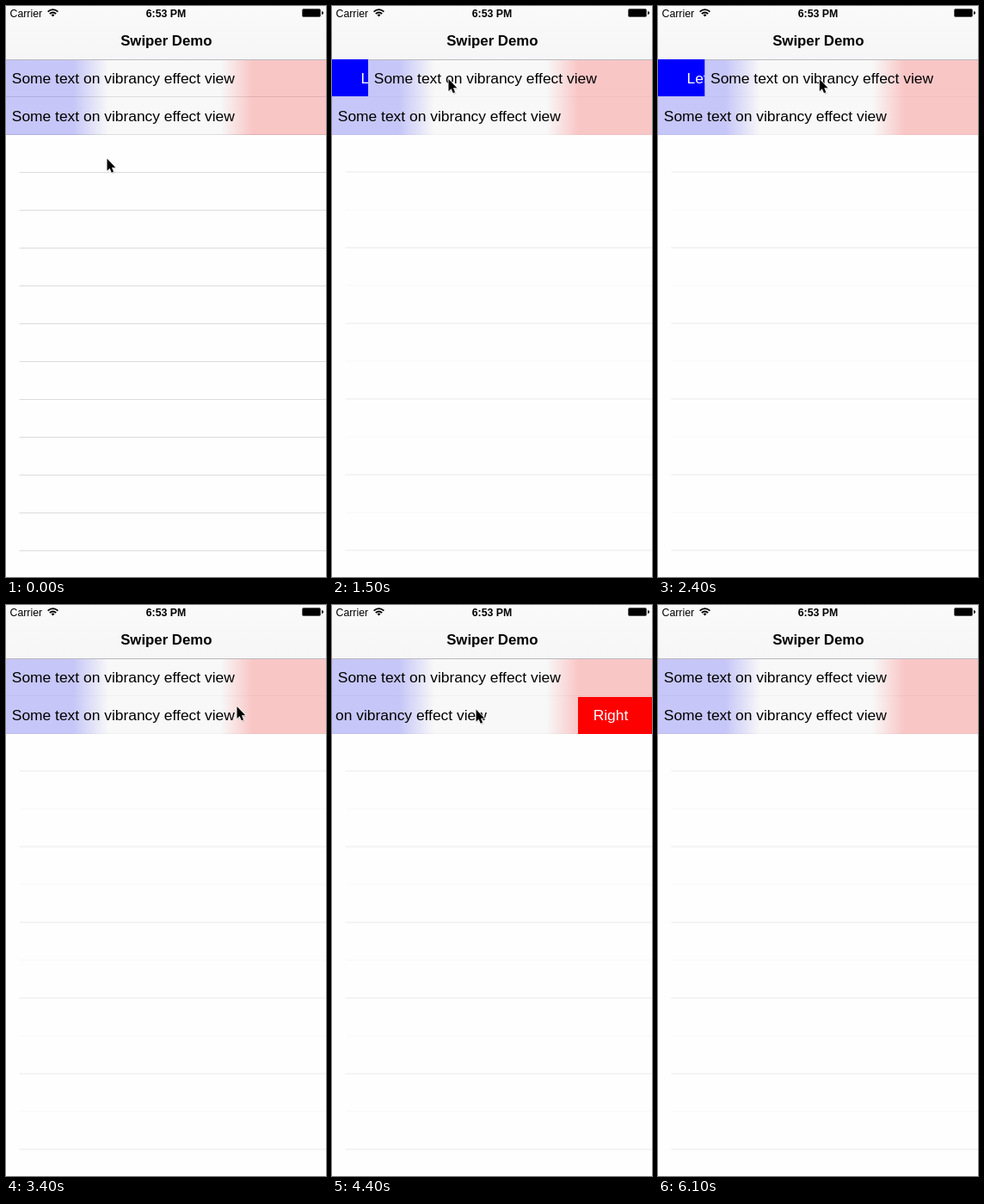
Write an HTML page that moves like this. It is 372 px wide and 664 px high and loops after 6200 ms.

```html
<!DOCTYPE html>
<html lang="en">
<head>
<meta charset="utf-8">
<title>Swiper Demo</title>
<style>
  html, body { margin: 0; width: 100%; height: 100%; overflow: hidden; background: #fefefe; }
  svg { display: block; width: 372px; height: 664px; }
  text { font-family: "Liberation Sans", Arial, sans-serif; font-size: 17.42px; }
  .small { font-size: 12.3px; }
  .bold { font-weight: bold; }
  .title { font-size: 16.8px; }
  .mid { text-anchor: middle; }
</style>
</head>
<body>
<svg viewBox="0 0 372 664">
  <defs>
    <linearGradient id="vibrancy">
      <stop offset=".21" stop-color="#c6c6f8"/>
      <stop offset=".32" stop-color="#f8f8f8"/>
      <stop offset=".67" stop-color="#f8f8f8"/>
      <stop offset=".77" stop-color="#f9c6c6"/>
    </linearGradient>
    <linearGradient id="bar" x2="0" y2="1">
      <stop offset="0" stop-color="#fafafa"/>
      <stop offset="1" stop-color="#f6f6f7"/>
    </linearGradient>
    <clipPath id="leftClip"><rect id="leftBox" y="62" height="43"/></clipPath>
    <clipPath id="rightClip"><rect id="rightBox" y="107" height="43"/></clipPath>
  </defs>

  <rect width="372" height="664" fill="#fefefe"/>
  <g id="lines"></g>

  <rect y="62" width="372" height="88" fill="url(#vibrancy)"/>
  <g id="rules">
    <rect y="105" width="372" height="1"/>
    <rect y="149" width="372" height="1"/>
  </g>
  <text id="row1" y="90">Some text on vibrancy effect view</text>
  <text id="row2" y="134">Some text on vibrancy effect view</text>

  <rect width="372" height="62" fill="url(#bar)"/>
  <rect y="62" width="372" height="1" fill="#b9b9be"/>
  <text class="bold mid title" x="186.3" y="46">Swiper Demo</text>
  <text class="small" x="4.5" y="12.6">Carrier</text>
  <text class="small bold mid" x="186" y="12.6">6:53 PM</text>
  <g fill="none" stroke="#000" stroke-width="1.8">
    <path d="M48.6 6.6Q54.5 1.6 60.4 6.6"/>
    <path d="M50.8 9Q54.5 5.9 58.2 9"/>
    <path d="M52.5 10.2Q54.5 8.7 56.5 10.2L54.5 12.4Z" fill="#000" stroke="none"/>
  </g>
  <rect x="344.5" y="3.5" width="21" height="9" rx="1.5" stroke="#555"/>
  <path d="M367 6Q369.2 6.4 369.2 8T367 10Z"/>

  <g clip-path="url(#leftClip)">
    <rect y="62" width="96" height="44" fill="#00f"/>
    <text class="mid" x="48" y="90" fill="#fff">Left</text>
  </g>
  <g clip-path="url(#rightClip)">
    <rect x="276" y="106" width="96" height="44" fill="#f00"/>
    <text class="mid" x="324" y="134" fill="#fff">Right</text>
  </g>

  <g id="cursor">
    <path d="M1 2V16.5L4.3 13.5L6.7 19L9.5 17.8L7.2 12.6H11.5Z" opacity=".18"/>
    <path d="M0 0V15L3.3 11.9L5.6 17.2L8 16.2L5.8 11H10.4Z" stroke="#fff" stroke-width="1.6" stroke-linejoin="round" paint-order="stroke"/>
  </g>
</svg>
<script>
const LOOP = 6200, STEP = 100, SOFTEN = 1100, HIDE = 6100;
const WIDTH = 372, OPEN = 96, TEXT_X = 6.8;
const $ = id => document.getElementById(id);

function set(el, attrs) {
  for (const name in attrs) el.setAttribute(name, attrs[name]);
}

const ramp = (t, from, to) => Math.min(1, Math.max(0, (t - from) / (to - from)));
const glide = (t, from, to) => {
  const p = ramp(t, from, to);
  return p * p * (3 - 2 * p);
};

const lines = Array.from({ length: 11 }, () => {
  const line = document.createElementNS("http://www.w3.org/2000/svg", "rect");
  set(line, { x: 15.5, width: WIDTH - 15.5 });
  $("lines").append(line);
  return line;
});

function drawLines(soft) {
  lines.forEach((line, i) => set(line, {
    y: 193 + 44 * i - (soft ? 1 : 0),
    height: soft ? 2 : 1,
    fill: !soft ? "#dcdcde" : i % 2 ? "#fbfbfb" : "#f4f4f4"
  }));
  set($("rules"), { opacity: soft ? .025 : .1 });
}

function draw(t) {
  const left = OPEN * (ramp(t, 1150, 1950) - ramp(t, 2200, 2660));
  const right = OPEN * (ramp(t, 3800, 4470) - ramp(t, 4700, 5000));

  // The pointer glides between rows and is carried along by each swipe
  const x = 117.5 - 42 * glide(t, 0, 800)
    + 18 * ramp(t, 1000, 1150) + left + 40 * ramp(t, 1950, 2200)
    + 135 * glide(t, 2700, 3400)
    - 15 * ramp(t, 3700, 3800) - right - 7.5 * ramp(t, 5000, 5300);
  const y = 177.5 - 92.5 * glide(t, 0, 800) + 33 * glide(t, 2700, 3400)
    + 3.5 * ramp(t, 3700, 4400) - 5 * ramp(t, 4700, 5300);

  drawLines(t >= SOFTEN);
  set($("row1"), { x: TEXT_X + left });
  set($("row2"), { x: TEXT_X - right });
  set($("leftBox"), { width: left });
  set($("rightBox"), { x: WIDTH - right, width: right });
  set($("cursor"), {
    transform: `translate(${x} ${y}) scale(.94)`,
    visibility: t < HIDE ? "visible" : "hidden"
  });
}

const start = performance.now();
function tick() {
  const t = (performance.now() - start) % LOOP;
  draw(Math.floor(t / STEP) * STEP);
  requestAnimationFrame(tick);
}
tick();
</script>
</body>
</html>
```
